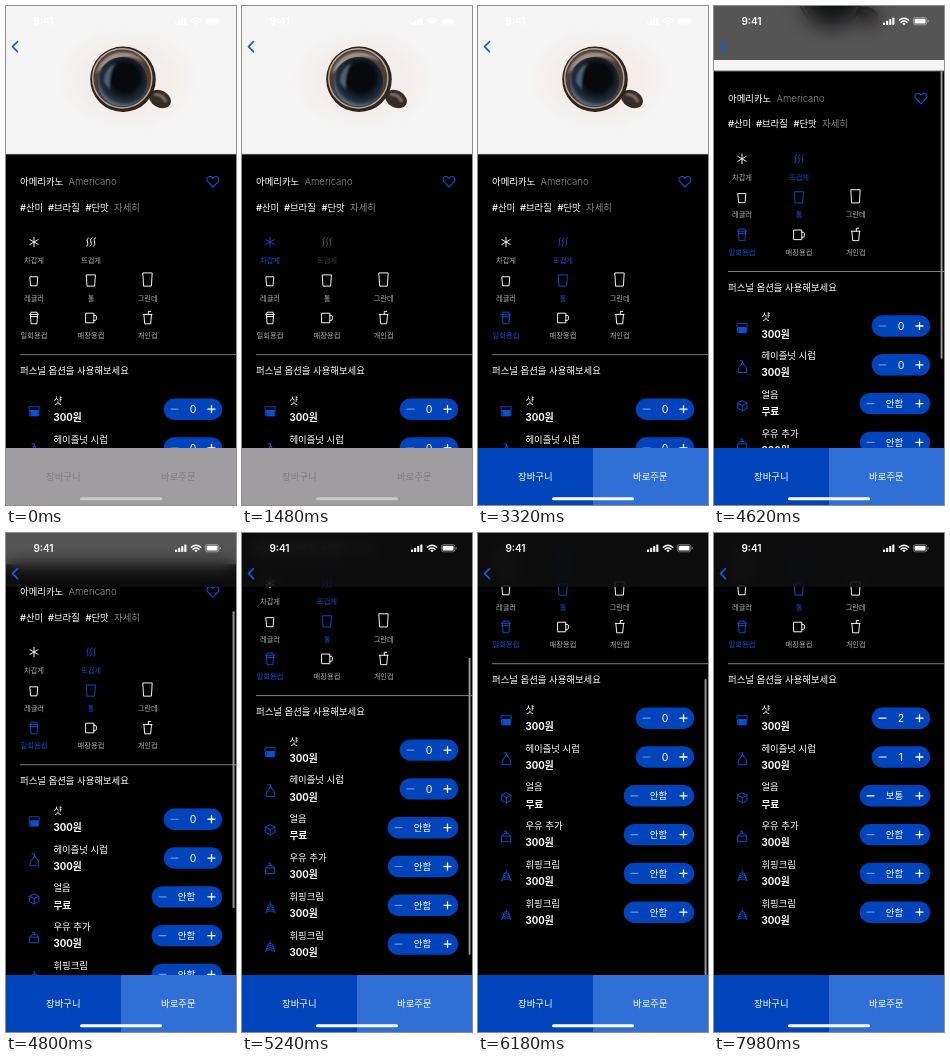
Recreate the animation shown at these times as an HTML page. Size 230x499 px, loop 8 s.

```html
<!DOCTYPE html>
<html lang="ko">
<head>
<meta charset="utf-8">
<style>
html, body { margin: 0; width: 100%; height: 100%; overflow: hidden; background: #000; }
svg, #nav { position: absolute; left: 0; top: 0; }
#nav { width: 230px; height: 53.5px; background: rgba(18,18,19,.7); backdrop-filter: blur(9px); }
text { font: 400 9.4px Inter, "Noto Sans CJK KR", "Noto Sans CJK JP", "Noto Sans CJK", sans-serif; fill: #fff; }
text.latin { font: 300 9.6px Inter, Roboto, sans-serif; }
text.small { font-size: 7.3px; text-anchor: middle; }
text.medium { font-weight: 500; }
text.bold { font-weight: 700; font-size: 9.7px; }
text.mid { text-anchor: middle; }
.num { font: 400 10.5px Inter, Roboto, sans-serif; text-anchor: middle; }
.line { fill: none; stroke-linecap: round; stroke-linejoin: round; }
</style>
</head>
<body>
<svg id="page" width="230" height="499" viewBox="0 0 230 499">
  <defs>
    <radialGradient id="halo">
      <stop offset=".6" stop-color="#f3eeeb"/>
      <stop offset="1" stop-color="#f5f4f4"/>
    </radialGradient>
    <radialGradient id="coffee" cx=".55" cy=".42" r=".62">
      <stop offset=".45" stop-color="#07090d"/>
      <stop offset=".8" stop-color="#22303f"/>
      <stop offset="1" stop-color="#6f879e"/>
    </radialGradient>
    <filter id="soft"><feGaussianBlur stdDeviation="1.1"/></filter>
  </defs>
  <rect width="230" height="499"/>
  <g id="content"></g>
</svg>
<div id="nav"></div>
<svg id="chrome" width="230" height="499" viewBox="0 0 230 499"></svg>
<script>
const LOOP = 8000;
const BLUE = [10, 79, 208], WHITE = [255, 255, 255], GRAY = [168, 168, 170];
const PILL = "#0044bb";
const $ = id => document.getElementById(id);
const rgb = c => `rgb(${c.map(Math.round).join()})`;
const mix = (a, b, k) => a.map((v, i) => v + (b[i] - v) * k);
const ramp = (t, a, b) => Math.min(1, Math.max(0, (t - a) / (b - a)));
const text = (x, y, s, cls = "", more = "") => `<text x="${x}" y="${y}" class="${cls}" ${more}>${s}</text>`;
const line = (d, color, w = 1) => `<path class="line" d="${d}" stroke="${color}" stroke-width="${w}"/>`;

// Icons are drawn around their own centre.
const flake = [0, 60, 120].map(a => {
  const x = 4.8 * Math.sin(a * Math.PI / 180), y = 4.8 * Math.cos(a * Math.PI / 180);
  return `M${x} ${y}L${-x} ${-y}`;
}).join("");
const steam = [-3.5, 0, 3.5].map(x => `M${x + .8} -4.2q-2.2 2 -.8 4.2t-.8 4.2`).join("");
const tumbler = (w, h) => `M${-w} ${-h}H${w}L${w - .8} ${h}H${.8 - w}Z`;
const paperCup = "M-4.2 -3.6H4.2M-3.6 -3.6L-3 -5.8H3L3.6 -3.6M-3.7 -3.6L-2.9 5.8H2.9L3.7 -3.6M-3.5 -1.4H3.5";
const mug = "M-5 -4.8H2.8V4.8H-5ZM2.8 -2.6H4.2Q5.4 -2.6 5.4 -1V.8Q5.4 2.4 4.2 2.4H2.8";
const ownCup = "M-4.4 -3.6H4.4M-3.8 -3.6L-3 5.8H3L3.8 -3.6M.6 -3.6V-6.6H3";

const choices = [
  { x: 28, y: 236, ly: 257, label: "차갑게", d: flake, press: 80, on: 500, off: 1570 },
  { x: 85, y: 236, ly: 257, label: "뜨겁게", d: steam, press: 1360, on: 1570 },
  { x: 28, y: 275.3, ly: 294.7, label: "레귤러", d: tumbler(3.8, 4.5) },
  { x: 85, y: 274.5, ly: 294.7, label: "톨", d: tumbler(4.4, 5.6), press: 2200, on: 2380 },
  { x: 141.7, y: 273.5, ly: 294.7, label: "그란데", d: tumbler(4.5, 6.6) },
  { x: 28, y: 312, ly: 332.2, label: "일회용컵", d: paperCup, press: 2860, on: 3040 },
  { x: 85, y: 312, ly: 332.2, label: "매장용컵", d: mug },
  { x: 141.7, y: 312, ly: 332.2, label: "개인컵", d: ownCup },
];

const blue = rgb(BLUE);
const optionIcons = {
  shot: `<path d="M-4.4 -1.2H4.4L3.6 4.8H-3.6Z" fill="${blue}"/>` + line("M-5 -4.6H5L4.2 4.6H-4.2Z", blue, .9),
  syrup: line("M-4 5.6H4.4V2Q4 -1 1.4 -2V-4H-1V-2Q-3.6 -1 -4 2ZM.2 -4V-6.2H-2.4", blue),
  ice: line("M0 -5L4.6 -2.6V2.6L0 5L-4.6 2.6V-2.6ZM-4.6 -2.6L0 -.2L4.6 -2.6M0 -.2V5", blue),
  milk: line("M-4.4 5H4.4V-.6L2.4 -3H-2.4L-4.4 -.6ZM-4.4 -.6H4.4M0 -3V-5.6H-2", blue),
  whip: line("M0 -5V-2M-2 -2.2Q0 -4 2 -2.2M-3 .2Q0 -2 3 .2M-4 2.6Q0 0 4 2.6M-4.6 5Q0 2 4.6 5M-2 -2L-4.4 5M2 -2L4.4 5", blue, .9),
};
const options = [
  { name: "샷", price: "300원", icon: "shot", taps: [6660, 6960], values: ["0", "1", "2"] },
  { name: "헤이즐넛 시럽", price: "300원", icon: "syrup", taps: [7300], values: ["0", "1"] },
  { name: "얼음", price: "무료", icon: "ice", taps: [7640], values: ["안함", "보통"] },
  { name: "우유 추가", price: "300원", icon: "milk" },
  { name: "휘핑크림", price: "300원", icon: "whip" },
  { name: "휘핑크림", price: "300원", icon: "whip" },
].map(o => ({ taps: [], values: ["안함"], ...o }));

const photo = `
  <rect y="-100" width="230" height="248" fill="#f5f5f5"/>
  <ellipse cx="121" cy="73" rx="69" ry="53" fill="url(#halo)"/>
  <ellipse cx="154" cy="93" rx="11.5" ry="8.5" transform="rotate(28 154 93)" fill="#352b27"/>
  <path d="M148 88Q157 88 160 96" fill="none" stroke="#94816f" stroke-width="2.4" filter="url(#soft)"/>
  <circle cx="117" cy="73.3" r="32.8" fill="#2b2421"/>
  <circle cx="116.3" cy="72.3" r="29.6" fill="#4b3d36" stroke="#b5a394" stroke-width="1.5"/>
  <path d="M90 68A27.5 27.5 0 0 1 138 56Q115 42 90 68Z" fill="#a39283" filter="url(#soft)"/>
  <circle cx="116.5" cy="75.5" r="24.6" fill="url(#coffee)"/>
  <path d="M98 76Q98 62 110 57Q103 66 104 84Z" fill="#7891a8" opacity=".6" filter="url(#soft)"/>
  <path d="M0 148.3H230" stroke="#777" stroke-width=".8"/>`;

const choiceMarkup = c => `<g>
  <path class="line" transform="translate(${c.x} ${c.y})" d="${c.d}" stroke-width=".95"/>
  ${text(c.x, c.ly, c.label, "small")}</g>`;

function optionMarkup(o, i) {
  const y = 394.3 + i * 38.8, py = y + 8.9, word = o.values[0] === "안함";
  const left = word ? 145.7 : 157.7, mid = word ? 180.5 : 187;
  return `<g>
    <g transform="translate(28.3 ${y + 11})">${optionIcons[o.icon]}</g>
    ${text(47.4, y + 3.4, o.name)}${text(47.4, y + 20.6, o.price, "bold")}
    <rect x="${left}" y="${py - 10.7}" width="${216.2 - left}" height="21.4" rx="10.7" fill="${PILL}"/>
    <path class="line minus" d="M${left + 7.3} ${py}h7" stroke="#fff" stroke-width="1.2"/>
    <path class="line plus" d="M202 ${py}h7M205.5 ${py - 3.5}v7" stroke="#fff" stroke-width="1.3"/>
    ${text(mid, py + (word ? 3.4 : 3.8), o.values[0], word ? "value mid" : "value num")}
  </g>`;
}

$("content").innerHTML = photo +
  text(14, 178.8, "아메리카노", "medium") + text(62.5, 178.8, "Americano", "latin", 'style="fill:#8b8b8e"') +
  line("M207 181L201.8 175.7C199.2 172.6 203.6 167.9 207 172.4C210.4 167.9 214.8 172.6 212.2 175.7Z", blue, 1.1) +
  text(14, 204.7, "#산미", "medium") + text(42, 204.7, "#브라질", "medium") + text(79.5, 204.7, "#단맛", "medium") +
  text(108, 204.7, "자세히", "", 'style="fill:#858588"') +
  `<g id="choices">${choices.map(choiceMarkup).join("")}</g>` +
  '<path d="M14 348.7H230" stroke="#8c8c8e" stroke-width=".9"/>' +
  text(14, 368.2, "퍼스널 옵션을 사용해보세요") +
  `<g id="options">${options.map(optionMarkup).join("")}</g>`;

const bars = [0, 1, 2, 3].map(i =>
  `<rect x="${169 + i * 3.1}" y="${16.5 - i * 1.7}" width="2.1" height="${2.5 + i * 1.7}" rx=".6" fill="#fff"/>`).join("");

$("chrome").innerHTML = `
  <rect id="thumb" x="226.6" width="1.9" height="297" rx="1" fill="#98989c"/>
  ${text(37.5, 19.2, "9:41", "num", 'style="font-weight:600;font-size:10px"')}${bars}
  ${line("M185.3 14.2Q190 10.2 194.7 14.2M187 16.2Q190 13.6 193 16.2", "#fff", 1.4)}
  <path d="M190 19.2L188.3 17.5Q190 16.2 191.7 17.5Z" fill="#fff"/>
  <rect x="199.4" y="11.6" width="13.4" height="7.2" rx="2.2" fill="none" stroke="#fff" stroke-opacity=".5" stroke-width=".8"/>
  <rect x="200.6" y="12.8" width="11" height="4.8" rx="1.2" fill="#fff"/>
  <path d="M213.8 13.8v2.8q1 -.4 1 -1.4t-1 -1.4" fill="#fff" opacity=".5"/>
  ${line("M11.5 35.6L6.5 40.6L11.5 45.6", "#0a5fe0", 1.6)}
  <rect id="cart" y="442" width="115" height="57"/>
  <rect id="order" x="115" y="442" width="115" height="57"/>
  ${text(57.3, 474.3, "장바구니", "mid tab")}${text(172.3, 474.3, "바로주문", "mid tab")}
  <rect id="home" x="74" y="491.2" width="82" height="3" rx="1.5"/>`;

const choiceEls = [...$("choices").children];
const optionEls = [...$("options").children];
const tabs = document.querySelectorAll(".tab");

// Time, offset and speed at points of the drag and its glide.
const drag = [[4160, 0, 0], [4620, 83, .19], [5240, 186, .12], [5800, 218, 0]];
function scrollAt(t) {
  if (t <= drag[0][0]) return 0;
  const i = drag.findIndex(p => t < p[0]);
  if (i < 0) return 218;
  const [t0, a, va] = drag[i - 1], [t1, b, vb] = drag[i];
  const h = t1 - t0, k = (t - t0) / h, k2 = k * k, k3 = k2 * k;
  return a * (2 * k3 - 3 * k2 + 1) + va * h * (k3 - 2 * k2 + k) + b * (3 * k2 - 2 * k3) + vb * h * (k3 - k2);
}

function draw(t) {
  choices.forEach((c, i) => {
    let on = 0, pressed = 0;
    if (c.on) {
      on = ramp(t, c.on, c.on + 60) - (c.off ? ramp(t, c.off, c.off + 60) : 0);
      pressed = ramp(t, c.press, c.press + 80) * (1 - ramp(t, c.on, c.on + 180));
    }
    const [icon, label] = choiceEls[i].children;
    icon.style.stroke = rgb(mix(WHITE, BLUE, on));
    label.style.fill = rgb(mix(GRAY, BLUE, on));
    choiceEls[i].style.opacity = 1 - .66 * pressed;
  });

  options.forEach((o, i) => {
    const el = optionEls[i], n = o.taps.filter(x => t >= x).length;
    el.querySelector(".value").textContent = o.values[n];
    el.querySelector(".minus").style.opacity = n ? 1 : .42;
    el.querySelector(".plus").style.opacity = 1 - .6 * Math.max(0, ...o.taps.map(x =>
      ramp(t, x - 100, x - 60) * (1 - ramp(t, x, x + 120))));
  });

  const s = scrollAt(t);
  $("content").setAttribute("transform", `translate(0 ${-s.toFixed(2)})`);
  $("nav").style.opacity = ramp(s, 0, 16);
  // The thumb stays hidden above the lower edge of the photo.
  const top = Math.max(s * .67, 148.5 - s), end = s * .67 + 297;
  $("thumb").setAttribute("y", top);
  $("thumb").setAttribute("height", Math.max(0, end - top));
  $("thumb").style.opacity = ramp(t, 4160, 4240) * (1 - ramp(t, 6260, 6560));

  const ready = ramp(t, 3060, 3220);
  $("cart").style.fill = rgb(mix([160, 157, 162], [0, 68, 187], ready));
  $("order").style.fill = rgb(mix([160, 157, 162], [48, 111, 214], ready));
  $("home").style.fill = rgb(mix([202, 200, 204], WHITE, ready));
  tabs.forEach(el => el.style.fill = rgb(mix([126, 124, 129], WHITE, ready)));
}

const start = performance.now();
function tick() {
  draw((performance.now() - start) % LOOP);
  requestAnimationFrame(tick);
}
tick();
</script>
</body>
</html>
```
